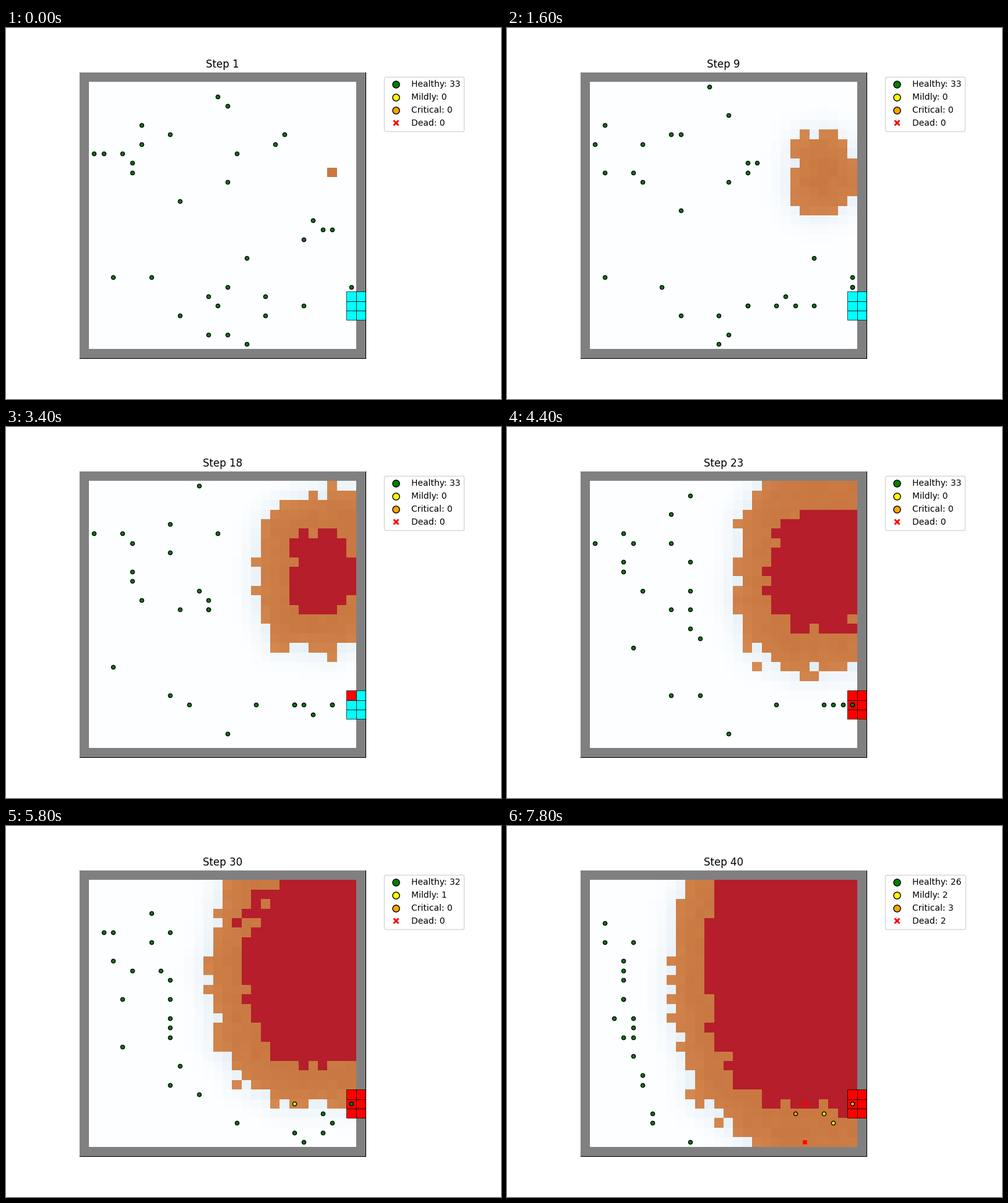
A matplotlib script for the animation above (8 s loop, 800 px wide and 600 px high).

```python
import numpy as np
import matplotlib.pyplot as plt
from matplotlib.animation import FuncAnimation
from matplotlib.lines import Line2D
from matplotlib.patches import Rectangle

STEPS = 40
SIZE = 30                  # room side in cells, walls included
ORIGIN = (10, 26)          # row and column where the fire starts
SPEED = 0.4                # cells the front gains per step
BURN_TIME = 9              # steps from catching fire to burnt out
EXIT = np.array([28, 24])  # x, y in front of the doors
BLOCKED = 18               # step at which the first door is blocked
FEAR = 5                   # distance from the fire at which people run
ONSETS = [30, 34, 36, 37, 37, 38, 39]   # steps at which people are hurt
WORSEN = 3                 # steps from one harm level to the next

# Cells (x, y) where people stand at the beginning
STARTS = [
    (14, 2), (15, 3), (6, 5), (9, 6), (6, 7), (21, 6), (20, 7), (1, 8),
    (2, 8), (4, 8), (5, 9), (5, 10), (16, 8), (15, 11), (10, 13), (24, 15),
    (25, 16), (26, 16), (23, 17), (17, 19), (3, 21), (7, 21), (15, 22),
    (13, 23), (14, 24), (19, 23), (28, 22), (10, 25), (19, 25), (23, 24),
    (13, 27), (15, 27), (17, 28),
]
LEVELS = {"Healthy": "green", "Mildly": "yellow",
          "Critical": "orange", "Dead": "red"}

CLEAR = np.array([253, 254, 255])
SMOKE = np.array([213, 230, 242])
FLAME = np.array([216, 142, 84])
EMBER = np.array([201, 120, 66])
BURNT = np.array([181, 30, 42])
WALL = 128

rng = np.random.default_rng(4)


def catch_times():
    """Step at which each cell catches fire: a ragged, growing oval."""
    rows, cols = np.mgrid[:SIZE, :SIZE]
    dx = np.abs(cols - 25)
    dy = np.abs(rows - ORIGIN[0]) / 1.2
    reach = (dx ** 2.5 + dy ** 2.5) ** 0.4
    times = (reach + 0.1) / SPEED + rng.normal(0, 1.1, reach.shape)
    times = np.maximum(times, 2)
    times[ORIGIN] = 1
    return times


def blur(field):
    for _ in range(3):
        p = np.pad(field, 1, mode="edge")
        p = (p[:-2] + p[1:-1] + p[2:]) / 3
        field = (p[:, :-2] + p[:, 1:-1] + p[:, 2:]) / 3
    return field


TIMES = catch_times()
GRAIN = rng.uniform(-0.12, 0.08, TIMES.shape)[..., None]


def room_image(step):
    fire = TIMES <= step
    heat = blur((TIMES <= max(step, 2) - 1 + (step > 2)).astype(float))
    heat = heat[..., None] * (step > 1)
    glow = np.clip(heat + GRAIN, 0, 1) if step > 1 else 1
    rgb = np.where(fire[..., None], FLAME + (EMBER - FLAME) * glow,
                   CLEAR + (SMOKE - CLEAR) * heat)
    rgb[TIMES <= step - BURN_TIME] = BURNT
    rgb[[0, -1]] = WALL
    rgb[:, [0, -1]] = WALL
    return rgb.round().astype(np.uint8)


def fire_distance(pos, step):
    cells = np.argwhere(TIMES <= step)[:, ::-1]
    return np.hypot(*(pos[:, None] - cells).transpose(2, 0, 1)).min(1)


def harm(onset, step):
    age = step - onset
    return sum((age >= n * WORSEN).astype(int) for n in range(3))


def simulate():
    """Positions, harm levels and presence of everyone at each step."""
    pos = np.array(STARTS)
    onset = np.full(len(pos), 999)
    gone = np.zeros(len(pos), bool)
    history = []
    for step in range(1, STEPS + 1):
        near = fire_distance(pos, step)
        for _ in range(ONSETS.count(step)):
            safe = gone | (onset < 999)
            onset[np.where(safe, np.inf, near).argmin()] = step
        level = harm(onset, step)
        history.append((pos.copy(), level, ~gone))

        # The closer the exit, the more often a step leads towards it
        far = np.hypot(*(EXIT - pos).T)
        keen = rng.random(len(pos)) < np.clip(1 - far / 16, 0, 0.6)
        move = rng.integers(-1, 2, pos.shape)
        move[rng.random(len(pos)) < 0.75] = 0
        move[keen] = np.sign(EXIT - pos)[keen]
        scared = (near < FEAR) & ~keen
        move[scared] = (-1, 1)
        move[level > 1] = 0
        pos = np.clip(pos + move, 1, SIZE - 2)
        if step < BLOCKED:
            gone |= (pos == EXIT).all(1)
    return history


CROWD = simulate()

fig, ax = plt.subplots(figsize=(8, 6), dpi=100)
fig.subplots_adjust(right=0.75)
room = ax.imshow(room_image(1), extent=(0, SIZE, SIZE, 0),
                 interpolation="nearest", zorder=3)
title = ax.set_title("Step 1")

doors = []
for y in range(23, 26):
    for x in (28, 29):
        door = Rectangle((x, y), 1, 1, fc="cyan", ec="black", lw=0.5, zorder=4)
        doors.append(ax.add_patch(door))

dots, handles = [], []
for level, color in enumerate(LEVELS.values()):
    dead = color == "red"
    style = dict(ls="", marker="X" if dead else "o", mfc=color)
    dots += ax.plot([], [], mec="red" if dead else "black",
                    ms=5 if dead else 4.5, zorder=5 + level, **style)
    handles.append(Line2D([], [], mec="white" if dead else "black", ms=8,
                          **style))
legend = ax.legend(handles, LEVELS, loc="upper left", bbox_to_anchor=(1.05, 1))
ax.set(xlim=(0, SIZE), ylim=(SIZE, 0), xticks=[], yticks=[], aspect="equal")


def draw(i):
    step = i + 1
    room.set_data(room_image(step))
    title.set_text(f"Step {step}")
    for n, door in enumerate(doors):
        door.set_facecolor("red" if step >= BLOCKED + n else "cyan")

    pos, level, here = CROWD[i]
    for n, (name, text) in enumerate(zip(LEVELS, legend.get_texts())):
        dots[n].set_data(*(pos[here & (level == n)] + 0.5).T)
        text.set_text(f"{name}: {(level == n).sum()}")
    return []


anim = FuncAnimation(fig, draw, frames=STEPS, interval=200, repeat=True,
                     repeat_delay=0)
plt.show()
```
